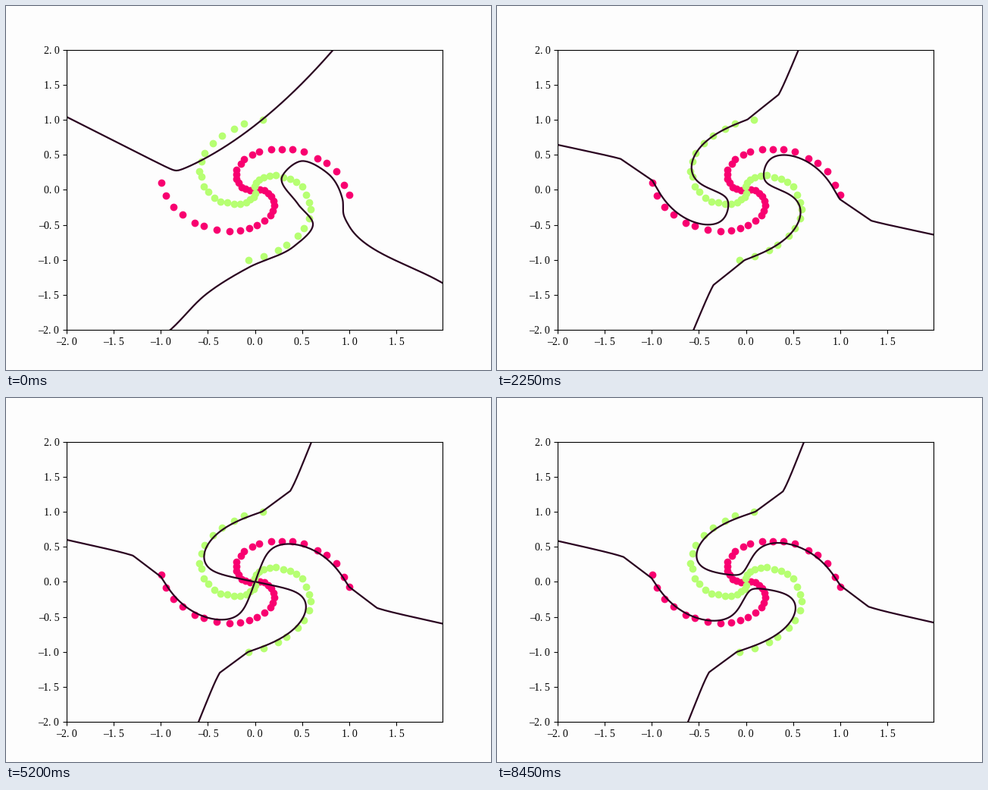
A matplotlib script that plays this animation: 640x480 px, repeating every 8.5 s.

```python
import numpy as np
import matplotlib.pyplot as plt
from matplotlib.animation import FuncAnimation

FRAMES, STEP = 170, 50
RED, GREEN, INK, PAPER = "#f80070", "#b6ff72", "#2a0420", "#fdfdfd"

# time -> opening of the saddle: + joins left/top, - joins left/bottom
TIMES = [0, 700, 1350, 2250, 3100, 4450, 5950, 7200, 8450]
OPENING = [0.3, 0.22, -0.065, 0.24, -0.125, 0.2, -0.19, -0.135, -0.125]
WARMUP = 700

# lower boundary before training
START_LOW = np.array([
    (-1.2, -2.33), (-0.9, -2), (-0.51, -1.48), (-0.07, -1.11), (0.41, -0.81),
    (0.615, -0.49), (0.454, -0.2), (0.285, 0.18), (0.49, 0.41), (0.776, 0.23),
    (0.928, -0.13), (0.944, -0.37), (1.0, -0.52), (1.99, -1.33), (2.4, -1.65)])


def ease(u):
    return u * u * (3 - 2 * u)


def opening(t):
    k = min(np.searchsorted(TIMES, t, "right") - 1, len(TIMES) - 2)
    u = (t - TIMES[k]) / (TIMES[k + 1] - TIMES[k])
    return OPENING[k] + (OPENING[k + 1] - OPENING[k]) * ease(u)


def polar(r, a):
    return np.column_stack([r * np.cos(a), r * np.sin(a)])


def smooth(p, n=500):
    """Cubic Hermite curve through p, sampled evenly along its length."""
    t = np.r_[0, np.cumsum(np.hypot(*np.diff(p, axis=0).T))]
    m = np.gradient(p, t, axis=0)
    u = np.linspace(0, t[-1], n)
    k = np.clip(np.searchsorted(t, u, "right") - 1, 0, len(t) - 2)
    h = (t[k + 1] - t[k])[:, None]
    s = (u - t[k])[:, None] / h
    e = ease(s)
    return (p[k] * (1 - e) + p[k + 1] * e
            + h * s * (1 - s) * ((1 - s) * m[k] - s * m[k + 1]))


def start_curves():
    x = np.linspace(-2.3, 1.1, 300)
    a, b = -0.32 - 0.68 * x, 0.92 + 1.05 * x + 0.3 * x**2
    y = (a + b + np.hypot(a - b, 0.05)) / 2
    return smooth(np.column_stack([x, y])), smooth(START_LOW)


def twist(r, t):
    """Angle of the left arm: a spiral inside, a straight line outside."""
    spiral = 2.85 + 0.8 * (1 - np.tanh((r - 0.8) / 0.22))
    d = 0.6 + 0.06 * ease(min(t / 5000, 1))
    tail = 3.07 - np.arcsin(d) + np.arcsin(d / np.maximum(r, 0.9))
    return np.maximum(spiral, tail)


def boundary(t):
    """Two twisted hyperbola branches, half a turn apart."""
    s = opening(t)
    tip = max(abs(s), 0.002)
    u = np.linspace(-1, 1, 601)
    r = tip + (2.6 - tip) * u**2
    spread = np.pi / 4 - np.arcsin((tip / r)**1.5) / 2
    side = 1 if s > 0 else -1
    a = twist(r, t) - side * (np.pi / 4 + np.sign(u) * spread)
    curves = [polar(r, a), polar(r, a + np.pi)]
    if t < WARMUP:
        w = (1 - t / WARMUP)**2
        curves = [smooth(c) * (1 - w) + p * w for c, p in zip(curves, START)]
    return curves


def label(v, _):
    # half-width digits, dash and point
    return f"{v:.1f}".replace("-", "\u2013").replace(".", ". ")


START = start_curves()

plt.rcParams["font.family"] = "Liberation Serif"
fig, ax = plt.subplots(figsize=(6.4, 4.8), dpi=100, facecolor=PAPER)
ax.set(xlim=(-2, 1.99), ylim=(-2, 2), facecolor=PAPER)
for axis in (ax.xaxis, ax.yaxis):
    axis.set_major_locator(plt.MultipleLocator(0.5))
    axis.set_major_formatter(plt.FuncFormatter(label))

# four spiral arms of dots, a quarter turn apart, two per class
rng = np.random.default_rng(4)
radius = np.arange(1, 21) / 20
for color, turn in ((RED, 0), (GREEN, np.pi / 2)):
    for half in (0, np.pi):
        angle = 3.34 - 3.42 * radius + turn + half
        angle += rng.uniform(-0.035, 0.035, radius.size)
        ax.scatter(*polar(radius, angle).T, s=36, c=color)

lines = [ax.plot([], [], color=INK, lw=1.6)[0] for _ in range(2)]


def update(i):
    for line, curve in zip(lines, boundary(i * STEP)):
        line.set_data(*curve.T)
    return lines


anim = FuncAnimation(fig, update, frames=FRAMES, interval=STEP,
                     repeat=True, repeat_delay=0)
plt.show()
```
